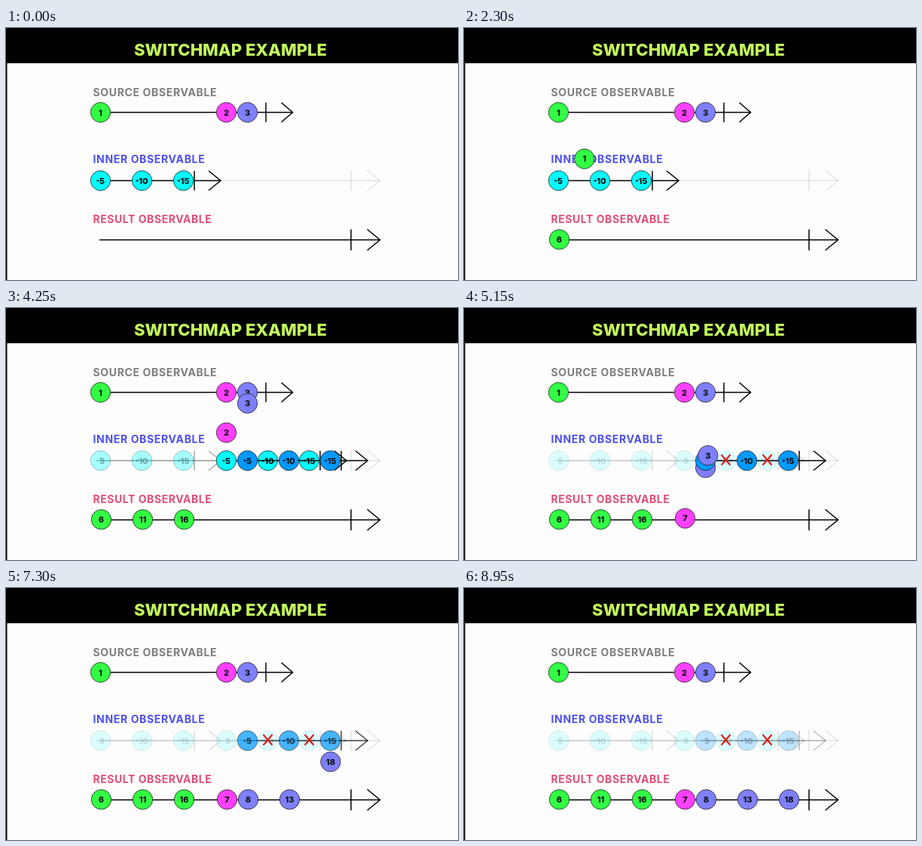
Animation, 600 px wide and 336 px high, one loop 9 s. Source, as an HTML page with a canvas:

```html
<!DOCTYPE html>
<html lang="en">
<head>
<meta charset="utf-8">
<title>switchMap example</title>
<style>
  html, body { margin: 0; width: 100%; height: 100%; overflow: hidden; background: #fdfdfd; }
  canvas { display: block; width: 600px; height: 336px; }
</style>
</head>
<body>
<canvas id="stage"></canvas>
<script>
const canvas = document.getElementById('stage');
const ratio = window.devicePixelRatio || 1;
canvas.width = 600 * ratio;
canvas.height = 336 * ratio;
const ctx = canvas.getContext('2d');
ctx.scale(ratio, ratio);

const LOOP = 9000, STEP = 50;
const GREEN = '#33ff44', PINK = '#ff40ff', VIOLET = '#8080ff', CYAN = '#00ffff', BLUE = '#0099ff';
const OUTER_Y = 112.5, INNER_Y = 203.5, RESULT_Y = 282.5;
const FALL = 1000, HOP = 1015, DROP = 500, HOP_HEIGHT = 31, GAP = 55;

// Each value falls from the top line to its inner row, then hops along it.
const values = [
  { n: 1, x: 125.5, color: GREEN, start: 665, hits: 3 },
  { n: 2, x: 292.5, color: PINK, start: 3660, hits: 1 },
  { n: 3, x: 320.5, color: VIOLET, start: 4090, hits: 3 }
];

// Opacity keys: [time, alpha]
const rows = [
  { x: 125.5, color: CYAN, alpha: [[0, 1], [3695, 1], [4100, .34], [4660, .34], [5050, .13]] },
  { x: 292.5, color: CYAN, alpha: [[3680, 0], [3930, 1], [4660, 1], [5050, .13]] },
  { x: 320.5, color: BLUE, alpha: [[3680, 0], [3930, 1], [7125, 1], [7600, .25]] }
];
const crossAlpha = [[4660, 0], [4960, 1]];

const clamp = v => Math.min(1, Math.max(0, v));
const mix = (a, b, p) => a + (b - a) * p;

function keyed(keys, t) {
  let value = keys[0][1];
  for (let i = 1; i < keys.length; i++) {
    const [t0, v0] = keys[i - 1], [t1, v1] = keys[i];
    if (t >= t0) value = mix(v0, v1, clamp((t - t0) / (t1 - t0)));
  }
  return value;
}

function text(str, x, y, size, weight, color, spacing = 0) {
  ctx.font = `${weight} ${size}px Inter, Lato, sans-serif`;
  ctx.letterSpacing = spacing + 'px';
  ctx.fillStyle = color;
  ctx.fillText(str, x, y);
}

function stroke(points, width, color) {
  ctx.beginPath();
  points.forEach(([x, y], i) => i ? ctx.lineTo(x, y) : ctx.moveTo(x, y));
  ctx.lineWidth = width;
  ctx.strokeStyle = color;
  ctx.stroke();
}

function arrow(x, bar, tip, y, half, depth) {
  stroke([[x, y], [tip, y]], 1.5, '#000');
  stroke([[bar, y - half], [bar, y + half]], 1.5, '#000');
  stroke([[tip - depth, y - half], [tip, y], [tip - depth, y + half]], 1.5, '#000');
}

function ball(x, y, color, label) {
  ctx.beginPath();
  ctx.arc(x, y, 13.2, 0, Math.PI * 2);
  ctx.fillStyle = color;
  ctx.fill();
  ctx.lineWidth = .8;
  ctx.strokeStyle = '#222';
  ctx.stroke();

  const plus = label[0] === '+';
  const digits = plus ? label.slice(1) : label;
  ctx.font = '800 11px Inter, Lato, sans-serif';
  ctx.letterSpacing = '0px';
  const width = ctx.measureText(digits).width;
  const left = x - width / 2 + (plus ? 2 : 0);
  if (plus) text('+', left - 4.6, y + 2.8, 7, 800, '#111');
  text(digits, left, y + 4, 11, 800, '#111');
}

function cross(x, y) {
  stroke([[x - 6, y - 7], [x + 6, y + 7]], 2, '#e01818');
  stroke([[x + 6, y - 7], [x - 6, y + 7]], 2, '#e01818');
}

function drawRow(row, t) {
  ctx.globalAlpha = keyed(row.alpha, t);
  if (ctx.globalAlpha > 0) {
    arrow(row.x, row.x + 124.5, row.x + 159.5, INNER_Y, 13, 16);
    for (let i = 0; i < 3; i++) ball(row.x + i * GAP, INNER_Y, row.color, '+' + (i + 1) * 5);
  }
  ctx.globalAlpha = 1;
}

function drawResults(v, t) {
  for (let i = 0; i < v.hits; i++) {
    const p = (t - v.start - FALL - i * HOP) / DROP;
    if (p < 0) continue;
    const x = v.x + i * GAP + clamp(p);
    ball(x, mix(INNER_Y, RESULT_Y - .5, clamp(p)), v.color, String(v.n + (i + 1) * 5));
  }
}

function drawMover(v, t) {
  const age = t - v.start;
  if (age < 0 || age >= FALL + (v.hits - 1) * HOP) return;
  if (age < FALL) {
    ball(v.x, mix(OUTER_Y, INNER_Y, age / FALL), v.color, String(v.n));
    return;
  }
  const hops = (age - FALL) / HOP, p = hops % 1;
  ball(v.x + hops * GAP, INNER_Y - 4 * HOP_HEIGHT * p * (1 - p), v.color, String(v.n));
}

function draw(t) {
  ctx.fillStyle = '#000';
  ctx.fillRect(0, 0, 600, 336);
  ctx.fillStyle = '#fdfdfd';
  ctx.fillRect(1.5, 47, 598.5, 289);

  text('SWITCHMAP EXAMPLE', 170, 36.5, 22, 800, '#c0f85c');
  text('SOURCE OBSERVABLE', 115.5, 91, 14, 700, '#7d7d7d', .65);
  text('INNER OBSERVABLE', 115.5, 180, 14, 700, '#4c50eb', .65);
  text('RESULT OBSERVABLE', 115.5, 260, 14, 700, '#e04e74', .55);

  arrow(125, 345, 380.5, OUTER_Y, 13, 15);
  arrow(124, 458, 496.5, RESULT_Y, 14, 17);
  ctx.globalAlpha = .1;
  arrow(125, 458, 496.5, INNER_Y, 14, 17);
  ctx.globalAlpha = 1;

  values.forEach(v => ball(v.x, OUTER_Y, v.color, String(v.n)));
  values.forEach(v => drawResults(v, t));
  rows.forEach(row => drawRow(row, t));

  ctx.globalAlpha = keyed(crossAlpha, t);
  [1, 2].forEach(i => cross(rows[1].x + i * GAP, INNER_Y - 1));
  ctx.globalAlpha = 1;

  values.forEach(v => drawMover(v, t));
}

const begin = performance.now();
function tick() {
  const t = (performance.now() - begin) % LOOP;
  draw(Math.floor(t / STEP) * STEP);
  requestAnimationFrame(tick);
}
tick();
</script>
</body>
</html>
```
